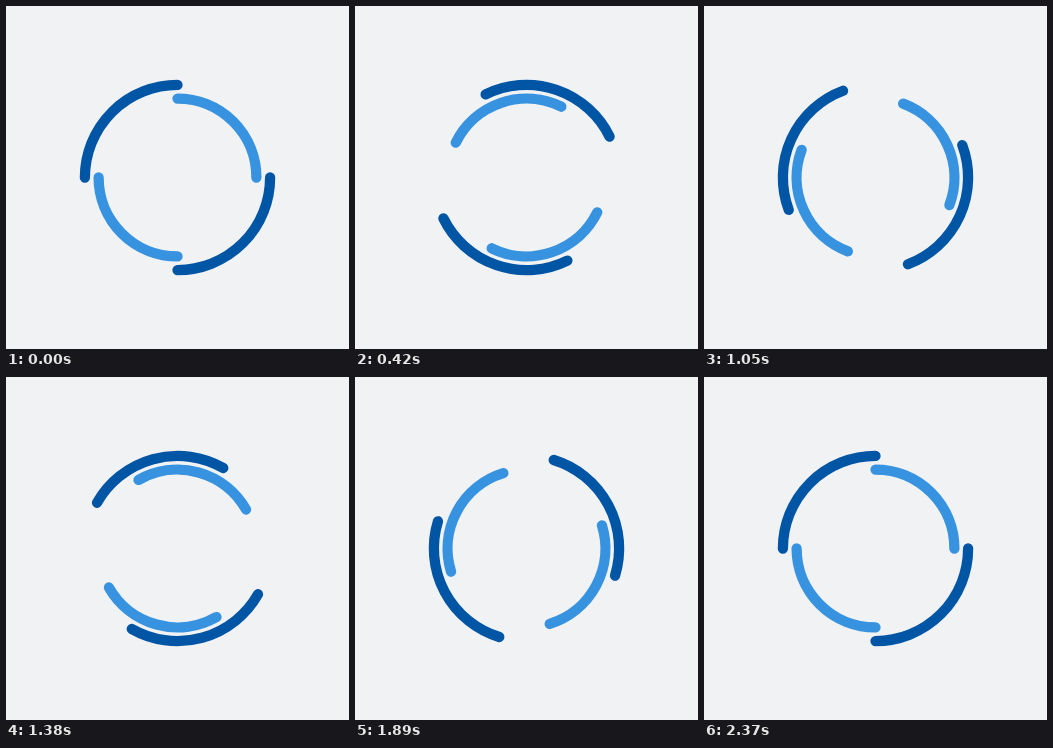
These frames come from a looping animation (343x343 px, 2400 ms). An HTML page:

```html
<!DOCTYPE html>
<html lang="en">
<head>
<meta charset="utf-8">
<title>Double ring loader</title>
<style>
  html, body { margin: 0; height: 100%; overflow: hidden; background: #f1f2f4; }
  svg { display: block; width: 100%; height: 100%; }
  path { fill: none; stroke-width: 3; stroke-linecap: round; }
</style>
</head>
<body>
<svg viewBox="0 0 100 100">
  <path id="outer" stroke="#0055a5" d="M77 50A27 27 0 0 1 50 77M23 50A27 27 0 0 1 50 23"/>
  <path id="inner" stroke="#3793e0" d="M50 73A23 23 0 0 1 27 50M50 27A23 23 0 0 1 73 50"/>
</svg>
<script>
  const LOOP = 2400, STEP = 30, TURN = 79; // one full turn takes 79 steps
  const outer = document.getElementById('outer');
  const inner = document.getElementById('inner');
  const rotate = (ring, angle) => ring.setAttribute('transform', `rotate(${angle} 50 50)`);

  function draw() {
    const step = Math.floor(((performance.now() + 4) % LOOP) / STEP);
    const angle = 360 * step / TURN;
    rotate(outer, angle);
    rotate(inner, -angle);
    requestAnimationFrame(draw);
  }
  draw();
</script>
</body>
</html>
```
